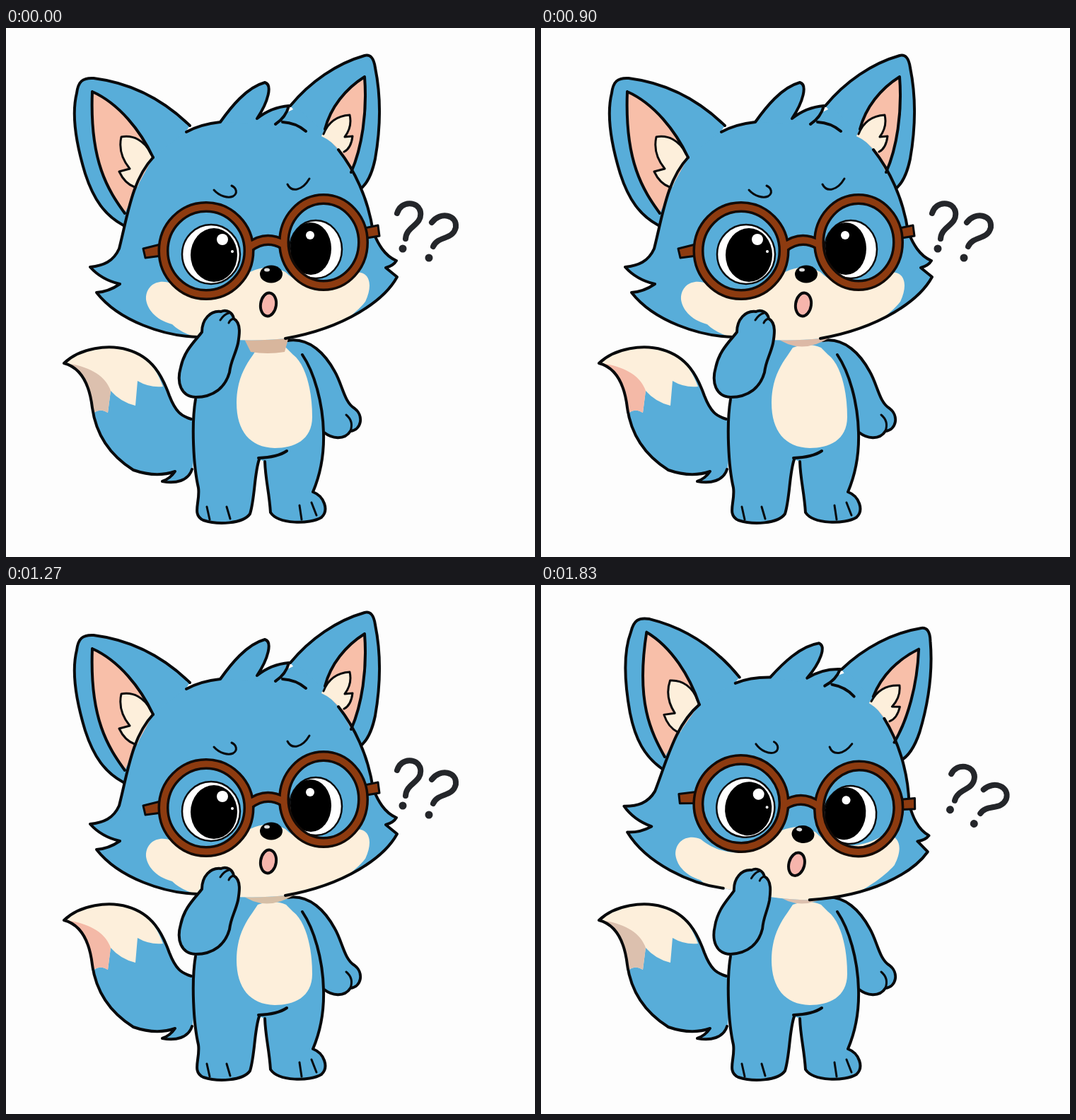
These frames come from a looping animation (748x748 px, 1890 ms). An HTML page:

```html
<!DOCTYPE html>
<html lang="en">
<head>
<meta charset="utf-8">
<title>Puzzled fox</title>
<style>
  html, body { margin: 0; width: 100%; height: 100%; overflow: hidden; background: #fdfdfd; }
  svg { display: block; width: 100vw; height: 100vh; }
  .line { fill: none; stroke: #080a0c; stroke-width: 4; stroke-linecap: round; stroke-linejoin: round; }
  .thin { stroke-width: 3; }
  .blue { fill: #58add9; }
  .cream { fill: #fdefdb; }
  .pink { fill: #f8bfa9; }
  .brown { fill: #8d3b10; }
  .rim { fill: none; stroke: #8d3b10; stroke-width: 9; }
  .rim.edge { stroke: #120a06; stroke-width: 16; }
  .mark { fill: none; stroke: #24262a; stroke-width: 8; stroke-linecap: round; }
</style>
</head>
<body>
<svg viewBox="0 0 748 748">
  <defs>
    <g id="frames">
      <ellipse cx="283" cy="315" rx="60.5" ry="62"/>
      <ellipse cx="449" cy="303" rx="56" ry="61"/>
      <path d="M344 310Q367 292 392 306"/>
    </g>
    <path id="skull" d="M208 183C178 215 172 265 160 312C152 330 138 336 119 338Q135 356 161 362Q145 373 128 374C160 415 225 436 275 437C315 442 360 443 395 439C480 424 535 385 553 352L537 339Q548 336 552 329C535 322 526 305 519 288C512 240 492 200 470 172L450 148L412 112L392 122L355 125L303 132L255 145Z"/>
    <clipPath id="inside"><use href="#skull"/></clipPath>
  </defs>

  <!-- tail -->
  <path class="blue" d="M82 474C105 452 145 447 172 455C207 465 221 492 231 520C240 543 250 550 270 556L264 622C258 640 240 645 221 641C230 638 235 633 239 627C222 633 203 633 180 625C145 603 127 573 122 537C118 503 105 480 82 474Z"/>
  <path class="cream" d="M82 474C105 452 145 447 172 455C203 464 214 486 222 507Q203 509 186 499L183 534Q162 529 148 513L144 544Q134 537 124 544C118 503 105 480 82 474Z"/>
  <path id="shade" d="M84 474C118 478 141 492 148 513L144 544Q134 537 124 544C118 503 105 480 84 474Z"/>
  <path class="line" d="M262 553C248 549 240 543 231 520C221 492 207 465 172 455C145 447 105 452 82 474C105 480 118 503 122 537C127 573 145 603 180 625C203 633 222 633 239 627C235 633 230 638 221 641C240 645 258 640 263 624"/>

  <!-- body -->
  <path class="blue" d="M268 525C262 560 265 620 272 650C275 670 262 688 279 696C300 703 335 701 345 687C352 665 351 630 358 610L366 613C367 640 372 655 374 685C385 702 430 702 446 692C457 682 450 662 434 656C445 630 450 605 450 572C460 580 478 584 487 570C503 568 506 548 493 538C478 529 476 505 465 486C452 462 430 437 398 442L300 440L262 490Z"/>
  <path class="line" d="M268 525C262 560 265 620 272 650C275 670 262 688 279 696C300 703 335 701 345 687C352 665 351 630 358 610M366 613C367 640 372 655 374 685C385 702 430 702 446 692C457 682 450 662 434 656C445 630 450 605 449 572C448 530 436 487 419 462M357 608Q384 607 397 598M398 442C430 437 452 462 465 486C476 505 478 529 493 538C506 548 503 568 487 570C478 584 460 580 450 572"/>
  <path class="line thin" d="M481 547Q492 556 487 570M284 677L288 695M312 677L317 694M415 675L418 695M432 671L439 689"/>
  <path class="cream" d="M348 464L356 452Q378 444 396 452L406 462C425 477 433 515 433 550C433 583 407 594 380 594C345 593 326 570 326 530C326 500 337 479 348 464Z"/>
  <path id="neck"/>

  <g id="head">
    <!-- ears -->
    <g class="line">
      <path class="blue" d="M260 138C225 104 180 78 124 71C108 70 102 76 100 92C93 120 98 160 112 206C124 243 140 265 166 279"/>
      <path class="blue" d="M402 110C430 76 468 50 507 39C515 37 520 42 522 56C531 100 529 145 522 185C517 209 510 222 499 229"/>
    </g>
    <use href="#skull" class="blue"/>
    <path class="pink" d="M122 90C160 107 190 145 208 183L185 225L168 262C145 230 118 190 122 90Z"/>
    <path class="pink" d="M507 69C480 86 456 115 449 150L472 174L488 204C503 170 511 120 507 69Z"/>
    <path class="cream" d="M208 183C196 159 180 151 163 154C159 172 166 188 175 199L160 203Q168 220 186 225Q193 203 208 183Z"/>
    <path class="cream" d="M446 153C456 132 470 124 486 123C489 136 485 146 479 154L490 153Q488 170 474 176Q462 160 446 153Z"/>
    <path class="line" d="M122 90C160 107 190 145 208 183M122 90C118 190 145 230 168 262M507 69C480 86 459 112 451 143M507 69C511 120 503 170 488 204"/>
    <path class="line thin" d="M205 178C196 159 180 151 163 154C159 172 166 188 175 199L160 203Q168 220 182 225M449 150C456 132 470 124 486 123C489 136 485 146 479 154L490 153Q488 170 478 175"/>

    <!-- hair -->
    <path class="blue" d="M303 133C318 112 340 84 366 77C377 80 371 104 355 128Q375 112 400 110Q396 126 381 137Z"/>
    <path class="line" d="M255 147Q275 136 303 133C318 112 340 84 366 77C377 80 371 104 355 128Q375 112 400 110Q396 126 381 136M391 133Q410 134 424 146"/>

    <!-- face -->
    <g clip-path="url(#inside)">
      <path id="muzzle" class="cream" d="M198 384C197 364 215 354 233 361C270 390 325 380 345 345Q372 332 395 345C425 375 470 360 490 346C512 341 521 360 508 387C490 410 440 445 395 449C355 453 315 451 282 440Q250 434 235 419C210 412 200 397 198 384Z"/>
    </g>
    <path class="line" d="M208 183C178 215 172 265 160 312C152 330 138 336 119 338Q135 356 161 362Q145 373 128 374C160 415 225 436 272 437M395 439C480 424 535 385 553 352L537 339Q548 336 552 329C535 322 526 305 519 288C512 240 492 200 470 172"/>
    <path class="line thin" d="M294 229C302 238 314 241 321 238C328 234 326 226 319 223M398 221C404 233 419 230 429 213"/>

    <!-- eyes -->
    <g class="line" style="stroke-width:2.5;fill:#fff">
      <ellipse cx="290" cy="320" rx="41" ry="42"/>
      <ellipse cx="438" cy="313" rx="37" ry="41"/>
    </g>
    <ellipse cx="294" cy="321" rx="33" ry="38"/>
    <ellipse cx="431" cy="312" rx="29" ry="37"/>
    <g fill="#fff">
      <circle cx="306" cy="299" r="8"/>
      <circle cx="320" cy="316" r="2"/>
      <circle cx="430" cy="293" r="6"/>
    </g>

    <!-- glasses -->
    <path class="line thin" style="fill:#8d3b10" d="M194 312L218 306L220 322L197 325ZM507 283L526 279L528 294L510 297Z"/>
    <use href="#frames" class="rim edge"/>
    <use href="#frames" class="rim"/>

    <ellipse cx="375" cy="348" rx="16" ry="12.5"/>
    <ellipse cx="369" cy="342" rx="4" ry="2.5" fill="#ddd"/>
    <ellipse class="line" style="fill:#f6b5ac" cx="371" cy="391" rx="11" ry="16.5" transform="rotate(8 371 391)"/>
  </g>

  <g id="arm">
    <g class="line">
      <path class="blue" d="M268 522C247 521 241 501 247 480C252 456 267 443 277 430C277 412 289 399 304 401C312 397 321 403 322 411C333 417 330 435 328 446C324 463 318 470 316 487C310 508 294 522 268 522Z"/>
    </g>
    <path class="line thin" d="M303 413Q308 405 315 403M315 417Q317 412 322 411"/>
  </g>

  <g id="marks">
    <path class="mark" d="M553 262C558 244 583 244 586 260C589 279 566 280 565 298"/>
    <path class="mark" d="M602 275C614 259 638 264 636 282C632 300 610 294 604 309"/>
    <circle cx="561" cy="312" r="5.5" fill="#24262a"/>
    <circle cx="598" cy="325" r="5.5" fill="#24262a"/>
  </g>
</svg>
<script>
const LOOP = 1890;
const tan = '#dcc0ae', salmon = '#f4b9a7', blush = '#fbd2ca';

// The muzzle turns less than the head that carries it.
const poses = {
  mid: { head: '', muzzle: '', arm: '', marks: '' },
  right: {
    head: 'translate(0 1) rotate(6.7 343 311)',
    muzzle: 'rotate(-4.5 370 375)',
    arm: 'translate(268 520) rotate(-2.5) scale(.97) translate(-268 -520)',
    marks: 'translate(21 13) rotate(11 597 290)'
  },
  left: {
    head: 'rotate(-7.2 398 372)',
    muzzle: 'rotate(4.5 375 375)',
    arm: 'translate(9 14)',
    marks: 'translate(-9 -2) rotate(-7 597 290)'
  }
};

const collar = 'M330 436Q366 464 408 438Z';
const bib = 'M335 436L346 458Q370 462 394 458L400 436Z';

// start time, pose, tail shade, neck colour, neck shape
const steps = [
  [0, 'mid', tan, '#d8b69d', bib],
  [330, 'right', tan, '#dcc0ae', collar],
  [630, 'mid', salmon, '#dcb9a6', collar],
  [970, 'left', blush, '#d9bcbe', collar],
  [1270, 'mid', salmon, '#d6bfa6', collar],
  [1600, 'right', tan, '#dcc0ae', collar]
];

const el = id => document.getElementById(id);

function draw(now) {
  const t = now % LOOP;
  const [, pose, shade, neckColor, neckShape] = steps.findLast(s => s[0] <= t) || steps[0];
  for (const [part, move] of Object.entries(poses[pose])) el(part).setAttribute('transform', move);
  el('shade').setAttribute('fill', shade);
  el('neck').setAttribute('fill', neckColor);
  el('neck').setAttribute('d', neckShape);
}

const start = performance.now();
function tick() {
  draw(performance.now() - start);
  requestAnimationFrame(tick);
}
tick();
</script>
</body>
</html>
```
